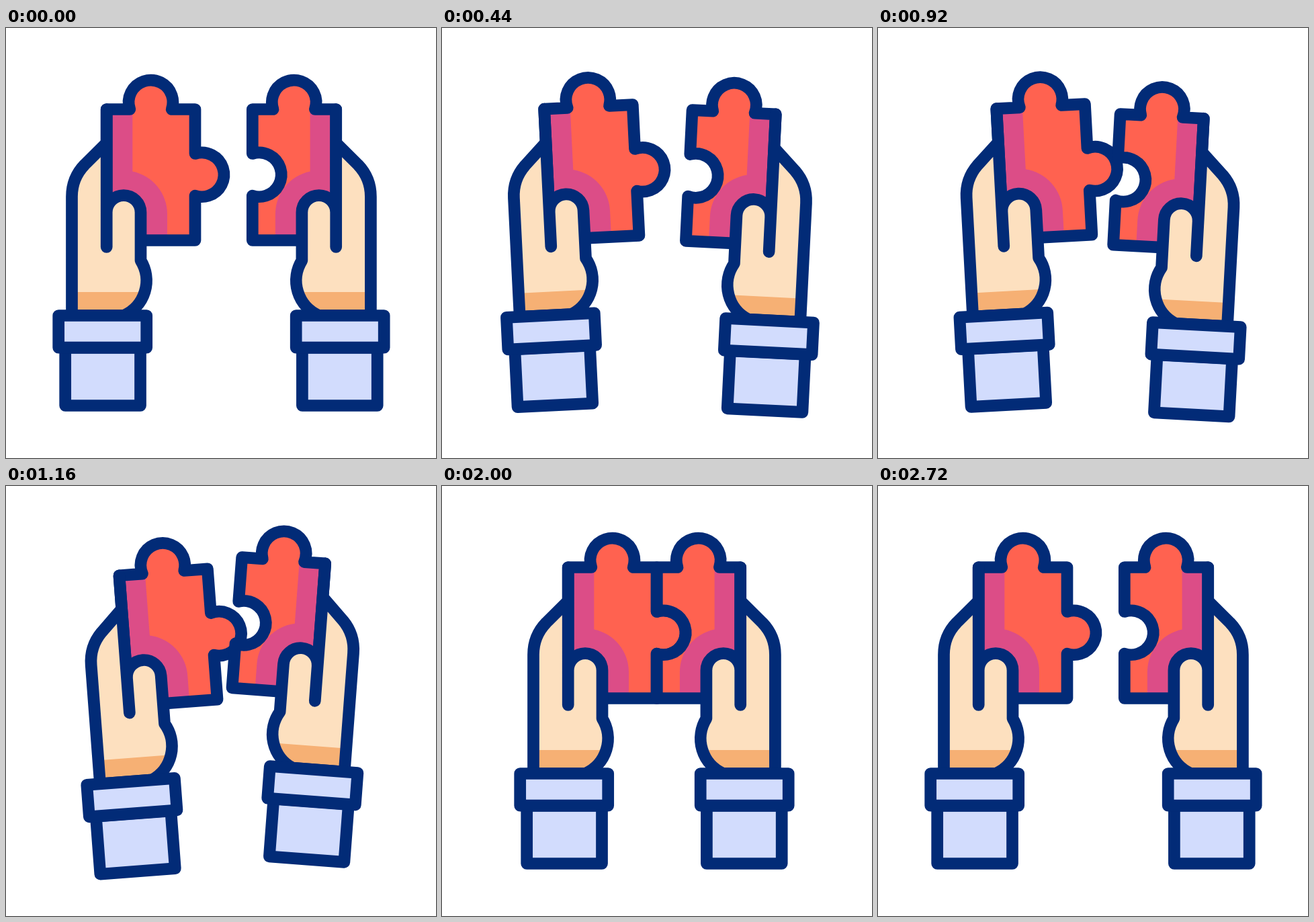
An HTML page with a canvas that plays this animation: 640x640 px, repeating every 2.96 s.

```html
<!DOCTYPE html>
<html lang="en">
<head>
<meta charset="utf-8">
<title>Puzzle hands</title>
<style>
  html, body { margin: 0; width: 100%; height: 100%; overflow: hidden; background: #fff; }
  canvas { display: block; width: 100vmin; height: 100vmin; }
</style>
</head>
<body>
<canvas id="stage" width="640" height="640"></canvas>
<script>
const ctx = document.getElementById('stage').getContext('2d');

const LOOP = 2960, STEP = 40, MIRROR = 640.9;
const NAVY = '#022b77', RED = '#ff6250', PINK = '#dc4d87';
const SKIN = '#fde0bf', SHADE = '#f6b074', CLOTH = '#d2dcfd';

// Smooth 0..1 progress of one movement.
function ramp(t, from, to) {
  const u = Math.min(1, Math.max(0, (t - from) / (to - from)));
  return u * u * (3 - 2 * u);
}

function motionAt(t) {
  return {
    pull: ramp(t, 0, 290),
    reach: ramp(t, 290, 576),
    rock: ramp(t, 890, 1250),
    join: ramp(t, 1480, 1930),
    open: ramp(t, 2240, 2720)
  };
}

// Distances towards the middle, vertical offsets, and the piece's outline.
const left = {
  dir: 1, pivotX: 201.5,
  back: 16.8, near: 37.3, rocked: 32.9, joined: 38,
  lift: -4.2, sway: 14.2,
  piece: piecePath(215.5, 281.5, 1)
};
const right = {
  dir: -1, pivotX: 465,
  back: 10.2, near: 16.7, rocked: 33.5, joined: 47,
  lift: 12.5, sway: -24.4,
  piece: piecePath(212.2, 274.1, -1)
};

function poseOf(side, m) {
  const away = m.pull - m.reach;
  const inward = side.near * m.reach - side.back * away
    + (side.rocked - side.near) * m.rock + (side.joined - side.rocked) * m.join;
  return {
    x: side.dir * inward * (1 - m.open),
    y: (side.lift * m.reach + side.sway * m.rock - 2 * away) * (1 - m.join),
    tilt: -side.dir * (2.6 * m.pull + 0.45 * m.reach + 1.5 * m.rock) * (1 - m.join)
  };
}

// bulge 1 gives a tab, -1 a socket.
function piecePath(knobX, edgeX, bulge) {
  const p = new Path2D(), r = 32.9;
  const neck = bulge > 0 ? 1.88 : Math.PI - 1.88;
  const turn = bulge > 0 ? neck : Math.PI - 1.88;
  p.moveTo(149.7, 121);
  p.arc(knobX, 110.5, r, Math.PI - 0.325, 0.325);
  p.lineTo(edgeX, 121);
  p.arc(edgeX + 10 * bulge, 218.3, r, -neck, turn, bulge < 0);
  p.lineTo(edgeX, 316);
  p.lineTo(149.7, 316);
  p.closePath();
  return p;
}

const pinkPart = new Path2D('M140 110H188.3V213.4A65 65 0 0 1 240 277V330H140Z');
const outline = 'M149.7 171L117 203.5C105 216 98 233 98 251V428'
  + 'H175.4A57 57 0 0 0 200.5 346V274.5A25.4 25.4 0 0 0 149.7 274.5';
const skin = new Path2D(outline + 'Z');
const handLine = new Path2D(outline + 'M149.7 121V326');

function fill(path, color) {
  ctx.fillStyle = color;
  ctx.fill(path);
}

function fillInside(clip, path, color) {
  ctx.save();
  ctx.clip(clip);
  fill(path, color);
  ctx.restore();
}

function rect(x, y, w, h) {
  const p = new Path2D();
  p.rect(x, y, w, h);
  return p;
}

const wrist = rect(80, 393, 150, 50);
const sleeve = rect(88.2, 476, 111.8, 86);
const cuff = rect(78.2, 428, 131, 47.7);

function drawHand(piece) {
  ctx.strokeStyle = NAVY;
  ctx.lineWidth = 17.7;
  ctx.lineJoin = ctx.lineCap = 'round';

  fill(piece, RED);
  fillInside(piece, pinkPart, PINK);
  ctx.stroke(piece);

  fill(skin, SKIN);
  fillInside(skin, wrist, SHADE);
  ctx.stroke(handLine);

  for (const part of [sleeve, cuff]) {
    fill(part, CLOTH);
    ctx.stroke(part);
  }
}

function drawSide(side, motion) {
  const { x, y, tilt } = poseOf(side, motion);
  ctx.save();
  ctx.translate(side.pivotX + x, 320 + y);
  ctx.rotate(tilt * Math.PI / 180);
  ctx.translate(-side.pivotX, -320);
  if (side.dir < 0) ctx.translate(MIRROR, 0);
  ctx.scale(side.dir, 1);
  drawHand(side.piece);
  ctx.restore();
}

const start = performance.now();

function frame() {
  const elapsed = (performance.now() - start) % LOOP;
  const motion = motionAt(Math.floor(elapsed / STEP) * STEP);
  ctx.fillStyle = '#fff';
  ctx.fillRect(0, 0, 640, 640);
  drawSide(left, motion);
  drawSide(right, motion);
  requestAnimationFrame(frame);
}
frame();
</script>
</body>
</html>
```
